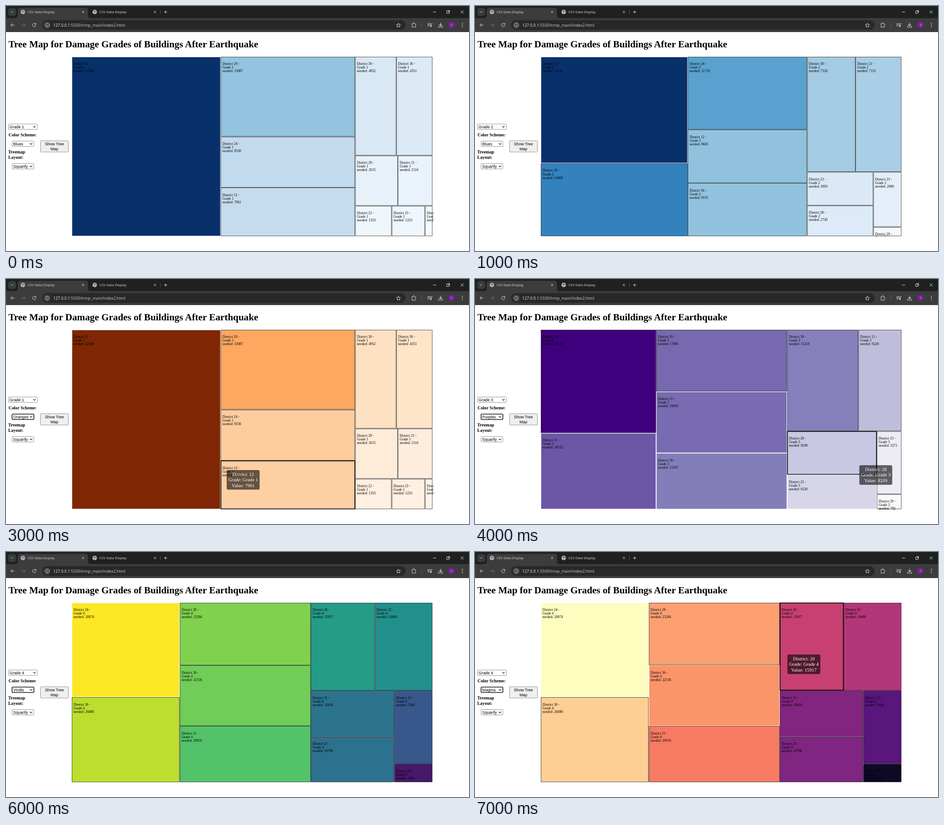
An HTML page that plays this animation: 1027 by 545 pixels, repeating every 8000 ms.

```html
<!DOCTYPE html>
<html lang="en">
<head>
<meta charset="utf-8">
<title>CSV Data Display</title>
<style>
html, body { margin: 0; width: 100%; height: 100%; overflow: hidden; background: #fff; }
svg { display: block; }
.ui { font-family: "Open Sans", "Noto Sans", sans-serif; font-size: 7.6px; fill: #dcdcdc; }
.page { font-family: "Liberation Serif", "Times New Roman", serif; }
.bold { font-weight: 700; font-size: 9.9px; }
.form { font-family: "Liberation Sans", Arial, sans-serif; font-size: 8.85px; }
.cell text { font-size: 11.65px; }
.line { fill: none; stroke: #dcdcdc; stroke-width: 1; }
.mid { text-anchor: middle; }
</style>
</head>
<body>
<svg width="1027" height="545" viewBox="0 0 1027 545">
  <defs>
    <clipPath id="stage"><rect width="1202" height="600.5"/></clipPath>
    <g id="globe">
      <circle r="5" fill="#c3c7c9"/>
      <path d="M-4 -2L-1 -1L0 1L-1 4M1 -4L0 -2L3 -1L4 1" fill="none" stroke="#55595b" stroke-width="1.3"/>
    </g>
    <path id="cross" class="line" d="M-2.3 -2.3L2.3 2.3M2.3 -2.3L-2.3 2.3"/>
  </defs>
  <rect width="1027" height="545" fill="#fff"/>

  <rect width="1027" height="28" fill="#1f2121"/>
  <rect y="27" width="1027" height="31" fill="#3c3c3c"/>
  <path d="M20 27Q26 27 26 21V10Q26 4 32 4H176Q182 4 182 10V21Q182 27 188 27Z" fill="#3c3c3c"/>
  <rect x="4.5" y="4.5" width="18" height="17.5" rx="5.5" fill="#3a3c3c"/>
  <path class="line" d="M11 12L13.5 14.5L16 12"/>
  <use href="#globe" x="37.5" y="13.3"/>
  <use href="#globe" x="196.8" y="13.3"/>
  <use href="#cross" x="171" y="13.3"/>
  <use href="#cross" x="330.3" y="13.3"/>
  <path class="line" d="M350.5 13.4H357.5M354 10V17M947 13.5H954M977.5 11.5H982.5V16.5H977.5ZM979.3 10H984V14.7M1008.5 10L1015 16.5M1015 10L1008.5 16.5" stroke-width=".9"/>
  <path d="M342.5 9V18M922.5 37V47" stroke="#5a5c5c"/>
  <g class="ui">
    <text x="48" y="16">CSV Data Display</text>
    <text x="207.3" y="16">CSV Data Display</text>
  </g>

  <rect x="80" y="31.5" width="806.5" height="21.5" rx="10.75" fill="#282828"/>
  <circle cx="91.5" cy="42.5" r="8" fill="#3c3c3c"/>
  <g class="line">
    <path d="M19 42.3H11M14.5 38.5L10.8 42.3L14.5 46"/>
    <path d="M34 42.3H42M38.6 38.5L42.4 42.3L38.6 46" stroke="#777"/>
    <path d="M65.7 40A3.8 3.8 0 1 0 66.4 43M66.3 38V41H63.3"/>
    <circle cx="91.5" cy="42.5" r="4.3"/>
    <path d="M91.5 42V45M91.5 39.8V40.8"/>
    <path d="M870.5 38L871.9 41.1L875.2 41.4L872.7 43.6L873.4 46.9L870.5 45.2L867.6 46.9L868.3 43.6L865.8 41.4L869.1 41.1Z"/>
    <path d="M900.5 39.5H903V38.3A1.3 1.3 0 0 1 905.7 38.3V39.5H908V42A1.4 1.4 0 0 1 908 44.8V47H900.5V44.7A1.4 1.4 0 0 0 900.5 42Z"/>
    <path d="M935 39.2H942M935 41.7H942M935 44.2H939M943.5 45V39.2H946"/>
    <circle cx="942.2" cy="45" r="1.2" fill="#dcdcdc"/>
    <path d="M964 37.5V44M961 41.3L964 44.2L967 41.3M959.5 44.5V47H968.5V44.5" stroke-width="1.2"/>
  </g>
  <circle cx="988.3" cy="42" r="6.7" fill="#7b1fa2"/>
  <g class="ui">
    <text class="mid" x="988.3" y="44.6" font-size="7">T</text>
    <text x="104.8" y="45.6" style="font-size:8.8px"><tspan fill="#eee">127.0.0.1</tspan><tspan fill="#cfcfcf">:5500/trmp_main/index2.html</tspan></text>
    <circle cx="1012.3" cy="38.5" r="1"/><circle cx="1012.3" cy="42.2" r="1"/><circle cx="1012.3" cy="45.9" r="1"/>
  </g>

  <g class="page">
    <text x="5.4" y="92.4" font-size="21.33" font-weight="700">Tree Map for Damage Grades of Buildings After Earthquake</text>
    <g class="bold">
      <text x="5.8" y="290.2">Color Scheme:</text>
      <text x="5" y="328">Treemap</text>
      <text x="5" y="340.4">Layout:</text>
    </g>
  </g>
  <g class="form">
    <rect x="76.5" y="299.8" width="62" height="25" rx="1.5" fill="#efefef" stroke="#767676" stroke-width=".8"/>
    <text class="mid" x="107.3" y="310">Show Tree</text>
    <text class="mid" x="107.3" y="320.6">Map</text>
    <g id="controls"></g>
  </g>
  <g class="page">
    <g id="map" transform="translate(145 112) scale(.668)" clip-path="url(#stage)"></g>
    <g id="tip"></g>
  </g>
</svg>
<script>
const ramps = {
  Blues: '#f7fbff #deebf7 #c6dbef #9ecae1 #6baed6 #4292c6 #2171b5 #08519c #08306b',
  Greens: '#f7fcf5 #e5f5e0 #c7e9c0 #a1d99b #74c476 #41ab5d #238b45 #006d2c #00441b',
  Oranges: '#fff5eb #fee6ce #fdd0a2 #fdae6b #fd8d3c #f16913 #d94801 #a63603 #7f2704',
  Purples: '#fcfbfd #efedf5 #dadaeb #bcbddc #9e9ac8 #807dba #6a51a3 #54278f #3f007d',
  Reds: '#fff5f0 #fee0d2 #fcbba1 #fc9272 #fb6a4a #ef3b2c #cb181d #a50f15 #67000d',
  Viridis: '#440154 #472d7b #3b528b #2c728e #21918c #28ae80 #5ec962 #addc30 #fde725',
  Magma: '#000004 #1c1044 #4f127b #812581 #b5367a #e55064 #fb8761 #fec287 #fcfdbf'
};

// Needed amount per district, largest first.
const grades = {
  1: [[31, 32540], [20, 13087], [24, 8330], [12, 7961], [30, 4952], [36, 4351],
      [28, 2615], [21, 2116], [22, 1353], [23, 1233], [29, 275]],
  2: [[31, 21135], [20, 14469], [24, 11726], [12, 8605], [36, 8555], [30, 7526],
      [21, 7151], [22, 2993], [28, 2745], [23, 2089], [29, 350]],
  3: [[24, 25130], [31, 18525], [20, 17085], [21, 16945], [36, 15507], [30, 15218],
      [12, 9220], [28, 8209], [22, 6520], [23, 3271], [29, 782]],
  4: [[24, 28974], [30, 26080], [28, 23284], [36, 22536], [21, 20910], [20, 15917],
      [22, 14409], [31, 10928], [23, 10796], [12, 7946], [29, 2001]]
};

// One view per second; "left" lists cells whose outline went white after hovering.
const views = [
  { grade: 1, scheme: 'Blues', left: [31] },
  { grade: 2, scheme: 'Blues', left: [31] },
  { grade: 2, scheme: 'Greens', left: [31], hover: 12, tip: [542, 283], focus: true },
  { grade: 1, scheme: 'Oranges', left: [31], hover: 12, tip: [489.5, 425], focus: true },
  { grade: 3, scheme: 'Purples', left: [31, 21, 36, 22], hover: 28, tip: [852.5, 414.2], focus: true },
  { grade: 3, scheme: 'Reds', left: [21], hover: 24, tip: [379.8, 244], focus: true },
  { grade: 4, scheme: 'Viridis', left: [24], focus: true },
  { grade: 4, scheme: 'Magma', left: [24, 36], hover: 20, tip: [693, 228], focus: true }
];

const byId = id => document.getElementById(id);

function shade(name, t) {
  const stops = ramps[name].split(' ').map(hex => [1, 3, 5].map(k => parseInt(hex.substr(k, 2), 16)));
  const last = stops.length - 1;
  const i = Math.min(last - 1, Math.floor(t * last));
  const u = t * last - i;
  const linear = name === 'Magma' || name === 'Viridis';
  const mix = [0, 1, 2].map(c => {
    const b = stops[i][c], d = stops[i + 1][c];
    if (linear) return Math.round(b + (d - b) * u);
    const a = i > 0 ? stops[i - 1][c] : 2 * b - d;
    const e = i < last - 1 ? stops[i + 2][c] : 2 * d - b;
    return Math.round(((1 - u) ** 3 * a + (4 - 6 * u * u + 3 * u ** 3) * b +
      (1 + 3 * u + 3 * u * u - 3 * u ** 3) * d + u ** 3 * e) / 6);
  });
  return `rgb(${mix})`;
}

// Squarified treemap aiming at the golden ratio, with a gap of 2 between cells.
function squarify(rows) {
  const cells = [], ratio = (1 + Math.sqrt(5)) / 2;
  let x0 = 1, y0 = 1, x1 = 1199, y1 = 599;
  let rest = rows.reduce((sum, row) => sum + row[1], 0);
  for (let start = 0, end = 0; start < rows.length; start = end) {
    const w = x1 - x0, h = y1 - y0;
    const alpha = Math.max(h / w, w / h) / (rest * ratio);
    const max = rows[start][1];
    let sum = 0, best = Infinity;
    for (; end < rows.length; end++) {
      const value = rows[end][1], beta = (sum + value) ** 2 * alpha;
      const worst = Math.max(max / beta, beta / value);
      if (worst > best) break;
      best = worst;
      sum += value;
    }
    const across = w < h, depth = (across ? h : w) * sum / rest;
    let offset = 0;
    for (const [id, value] of rows.slice(start, end)) {
      const size = (across ? w : h) * value / sum;
      const box = across ? [x0 + offset, y0, size, depth] : [x0, y0 + offset, depth, size];
      cells.push({ id, value, x: box[0] + 1, y: box[1] + 1, w: box[2] - 2, h: box[3] - 2 });
      offset += size;
    }
    if (across) y0 += depth; else x0 += depth;
    rest -= sum;
  }
  return cells;
}

function select(x, y, w, label, focus) {
  return `<rect x="${x}" y="${y}" width="${w}" height="12" rx="1.5" fill="#fff"
      stroke="${focus ? '#101010' : '#767676'}" stroke-width="${focus ? 1.6 : .8}"/>
    <text x="${x + 2.6}" y="${y + 9.1}">${label}</text>
    <path d="M${x + w - 9} ${y + 4.8}l2.6 2.6l2.6 -2.6" fill="none" stroke="#111" stroke-width="1.2"/>`;
}

function cellMarkup(cell, view, max) {
  const hovered = cell.id === view.hover;
  const stroke = view.left.includes(cell.id) ? '#fff' : '#000';
  const lines = [`District ${cell.id} -`, `Grade ${view.grade}`, `needed: ${cell.value}`];
  return `<g class="cell" transform="translate(${cell.x} ${cell.y})">
    <rect width="${cell.w}" height="${cell.h}" fill="${shade(view.scheme, cell.value / max)}"
      stroke="${stroke}" stroke-width="${hovered ? 2.5 : 1}"/>
    ${lines.map((line, i) => `<text x="5" y="${27 + 12 * i}">${line}</text>`).join('')}</g>`;
}

function tipMarkup(view) {
  if (!view.tip) return '';
  const value = grades[view.grade].find(row => row[0] === view.hover)[1];
  const lines = [`District: ${view.hover}`, `Grade: Grade ${view.grade}`, `Value: ${value}`];
  return `<g transform="translate(${view.tip})" font-size="10.67" fill="#fff">
    <rect width="73" height="43.6" rx="3.3" fill="#000" fill-opacity=".6"/>
    ${lines.map((line, i) => `<text class="mid" x="36.5" y="${13 + 12.3 * i}">${line}</text>`).join('')}</g>`;
}

function show(view) {
  const rows = grades[view.grade];
  byId('controls').innerHTML = select(5.5, 262.5, 64, `Grade ${view.grade}`) +
    select(13.5, 300.5, 48.3, view.scheme, view.focus) + select(13.5, 350.5, 48.3, 'Squarify');
  byId('map').innerHTML = squarify(rows).map(cell => cellMarkup(cell, view, rows[0][1])).join('');
  byId('tip').innerHTML = tipMarkup(view);
}

const began = performance.now();
let current = -1;
function tick() {
  const index = Math.floor((performance.now() - began) / 1000) % views.length;
  if (index !== current) show(views[current = index]);
  requestAnimationFrame(tick);
}
tick();
</script>
</body>
</html>
```
